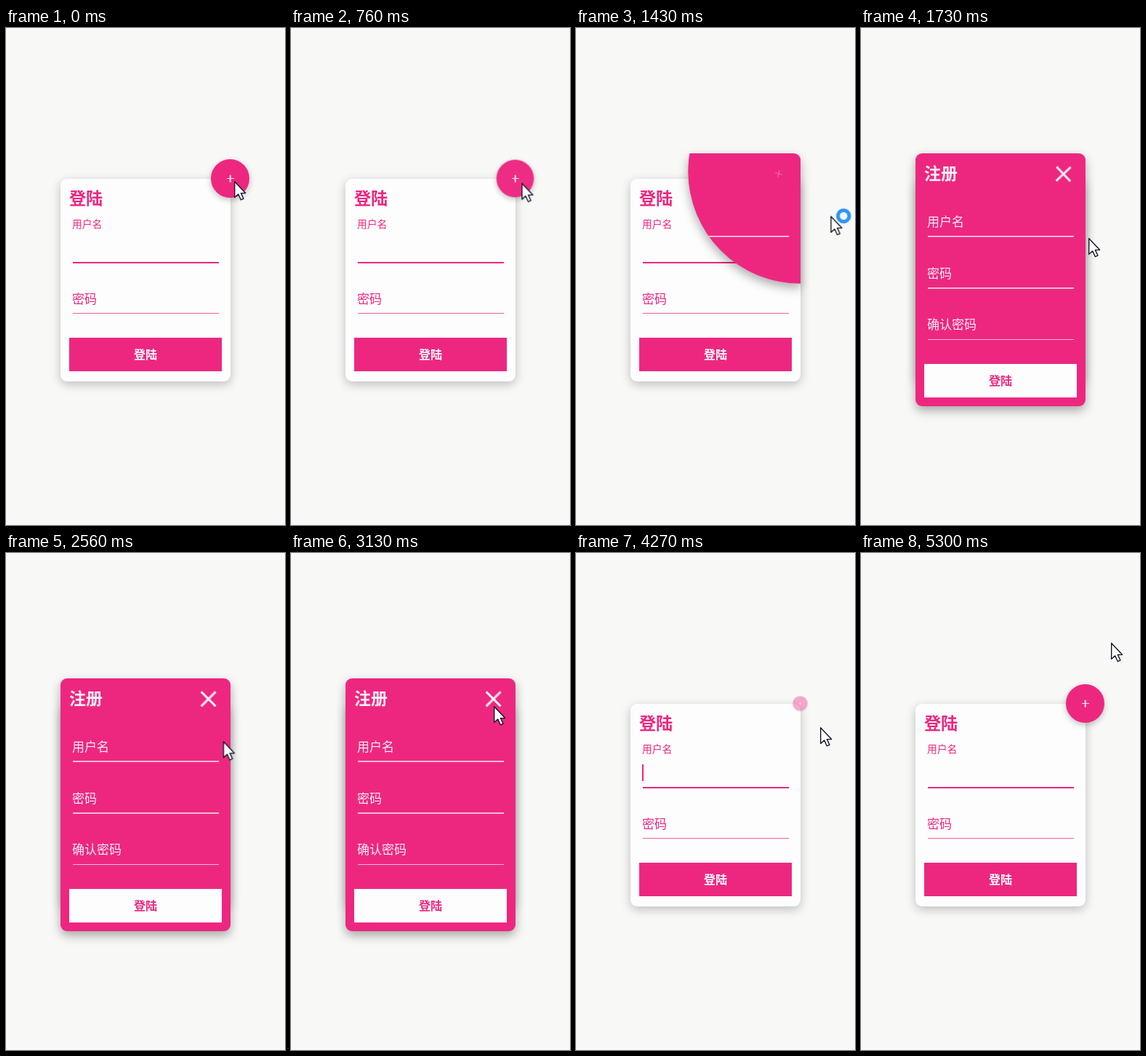
Animation of 384 by 682 pixels, one loop 5330 ms. Source, as an HTML page:

```html
<!DOCTYPE html>
<html lang="zh-CN">
<head>
<meta charset="utf-8">
<title>登陆 / 注册</title>
<style>
  :root { --pink: #ed2780; --loop: 5330ms; }
  html, body { margin: 0; width: 100%; height: 100%; overflow: hidden; background: #f8f8f7; }
  body { position: relative; font-family: "Noto Sans CJK SC", "Noto Sans CJK", sans-serif; }
  div, h2, label, svg { position: absolute; margin: 0; white-space: nowrap; }

  .card { left: 75px; width: 233.5px; border-radius: 9px; }
  .login { top: 206.5px; height: 278px; background: #fdfdfd; color: var(--pink);
           box-shadow: 0 4px 14px rgba(0, 0, 0, .24); }
  .layer { inset: 0; filter: drop-shadow(0 6px 7px rgba(0, 0, 0, .32)); }
  .register { top: 171.5px; height: 347px; background: var(--pink); color: #fff0f5;
              animation: reveal var(--loop) infinite; }

  h2 { left: 12px; font: 700 23px/30px "Noto Sans CJK SC", "Noto Sans CJK", sans-serif; }
  label { left: 16px; font-size: 17px; line-height: 24px; }
  .small { font-size: 13.8px; }
  .line { left: 16.5px; width: 201px; height: 1.5px; background: #ffb9d2; }
  .login .line { background: #f0609f; }
  .login .focus { height: 2px; background: var(--pink); }
  .button { left: 12px; width: 210px; height: 46px; text-align: center;
            font-size: 16px; font-weight: 700; line-height: 44px; }
  .login .button { background: var(--pink); color: #fff; }
  .register .button { background: #fdfdfd; color: var(--pink); }

  .caret { left: 16px; top: 83.5px; width: 2px; height: 23px; background: var(--pink);
           animation: blink var(--loop) step-end infinite; }
  .fab { left: 282px; top: 180px; width: 53px; height: 53px; border-radius: 50%;
         background: var(--pink); box-shadow: 0 3px 9px rgba(0, 0, 0, .24);
         animation: fab var(--loop) infinite; }
  .cross::before, .cross::after { content: ""; position: absolute; background: currentColor;
         left: calc(50% - var(--len) / 2); top: calc(50% - var(--w) / 2);
         width: var(--len); height: var(--w); }
  .cross::after { transform: rotate(90deg); }
  .fab { --len: 10px; --w: 1.5px; color: #ffdce8; }
  .close { left: 189px; top: 13px; width: 30px; height: 30px; --len: 28px; --w: 3px;
           animation: close var(--loop) infinite; }

  .pointer { left: 0; top: 0; overflow: visible; animation: move var(--loop) linear infinite; }
  .busy { animation: busy var(--loop) step-end infinite; }

  @keyframes reveal {
    0%, 22.23% { clip-path: circle(0px at 100% 25px); animation-timing-function: ease-in-out; }
    33.49%, 65.99% { clip-path: circle(443px at 100% 25px); animation-timing-function: ease-in-out; }
    77.25%, 100% { clip-path: circle(0px at 100% 25px); }
  }
  @keyframes close {
    0%, 22.23% { transform: rotate(135deg) scale(0); opacity: 0; animation-timing-function: ease-in-out; }
    33.49%, 65.99% { transform: rotate(45deg) scale(1); opacity: 1; animation-timing-function: ease-in-out; }
    77.25%, 100% { transform: rotate(135deg) scale(0); opacity: 0; }
  }
  @keyframes fab {
    0%, 12.95% { transform: scale(1); opacity: 1; animation-timing-function: ease-in-out; }
    24.2%, 75.27% { transform: scale(0); opacity: 0; animation-timing-function: ease-in-out; }
    86.53%, 100% { transform: scale(1); opacity: 1; }
  }
  @keyframes blink {
    0%, 10.32%, 80.68%, 99.43% { opacity: 0; }
    .94%, 71.29%, 90.06% { opacity: 1; }
    100% { opacity: 0; }
  }
  @keyframes busy {
    0% { opacity: 0; }
    16% { opacity: 1; }
    31.6%, 100% { opacity: 0; }
  }
  @keyframes move {
    0%, 13.5% { transform: translate(314px, 210px); }
    21.2% { transform: translate(346px, 235px); }
    23.08%, 24.5% { transform: translate(356px, 250px); }
    31.1% { transform: translate(340px, 272px); }
    32.3%, 43.2% { transform: translate(313px, 288px); }
    51.97% { transform: translate(287px, 234px); }
    55.3% { transform: translate(282px, 201px); }
    58.2%, 64.5% { transform: translate(279px, 210px); }
    69.5% { transform: translate(336px, 238px); }
    80%, 92% { transform: translate(336px, 239px); }
    96.6% { transform: translate(348px, 165px); }
    99.4%, 100% { transform: translate(344px, 123px); }
  }
</style>
</head>
<body>
  <div class="card login">
    <h2 style="top: 10px">登陆</h2>
    <label class="small" style="top: 49px">用户名</label>
    <div class="caret"></div>
    <div class="line focus" style="top: 114px"></div>
    <label style="top: 152px">密码</label>
    <div class="line" style="top: 184px"></div>
    <div class="button" style="top: 218.5px">登陆</div>
  </div>

  <div class="fab cross"></div>

  <div class="layer">
    <div class="card register">
      <h2 style="top: 11px">注册</h2>
      <div class="close cross"></div>
      <label style="top: 81.5px">用户名</label>
      <div class="line" style="top: 113.5px"></div>
      <label style="top: 152.5px">密码</label>
      <div class="line" style="top: 184.5px"></div>
      <label style="top: 222.5px">确认密码</label>
      <div class="line" style="top: 255px"></div>
      <div class="button" style="top: 289px">登陆</div>
    </div>
  </div>

  <svg class="pointer" width="30" height="28">
    <path d="M.7 .8V22.6L5.7 18 9.3 25.8 13 24.2 9.4 16.6H15.6Z"
          fill="#fff" stroke="#15152a" stroke-width="1.4" stroke-linejoin="round"/>
    <circle class="busy" cx="18" cy="0" r="7.8" fill="#f2f8fc" stroke="#3096f0" stroke-width="5"/>
  </svg>
</body>
</html>
```
